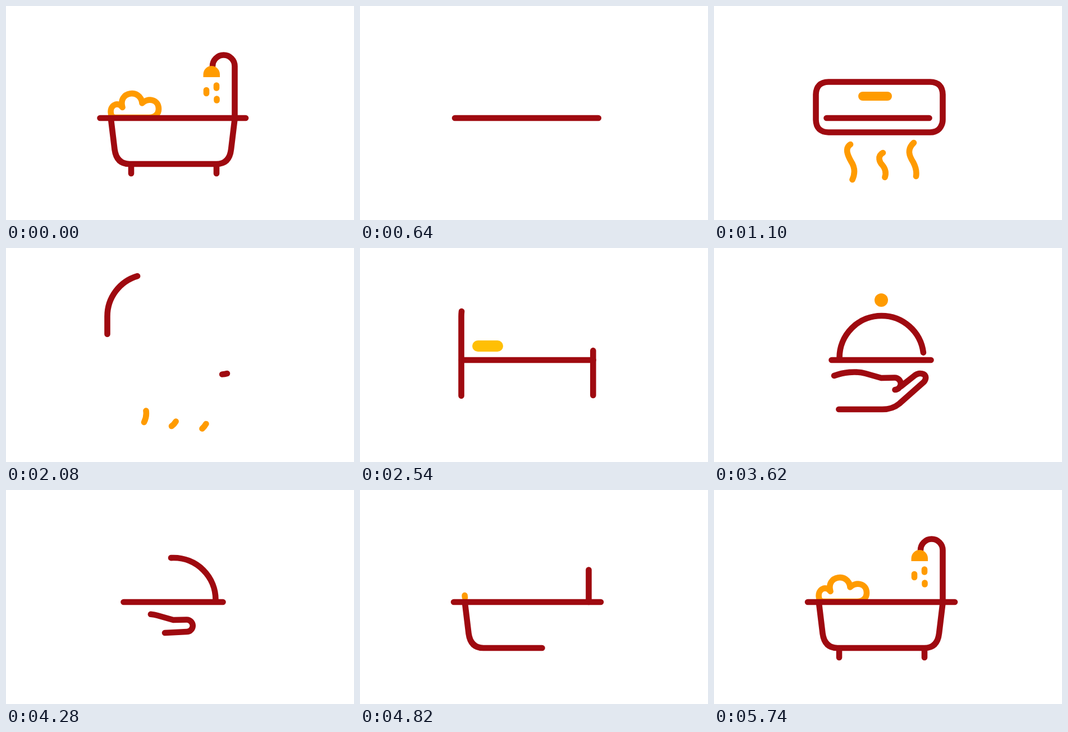
Animation, 620 px wide and 382 px high, one loop 5760 ms. Source, as an HTML page:

```html
<!DOCTYPE html>
<html lang="en">
<head>
<meta charset="utf-8">
<title>Room icons</title>
<style>
  html, body { margin: 0; width: 100%; height: 100%; overflow: hidden; background: #fff; }
  svg { display: block; width: 620px; height: 382px; }
  path { fill: none; stroke-width: 10.6; stroke-linecap: round; stroke-linejoin: round; }
</style>
</head>
<body>
<svg id="stage" viewBox="0 0 620 382"></svg>
<script>
const LOOP = 5760, RED = '#9f0a10', ORANGE = '#ff9b00';
const stage = document.getElementById('stage');

const clamp = x => Math.max(0, Math.min(1, x));
const inOut = x => x < .5 ? 2 * x * x : 1 - 2 * (1 - x) * (1 - x);
const out = x => 1 - (1 - x) * (1 - x);
const ramp = (t, a, b, ease = inOut) => ease(clamp((t - a) / (b - a)));

// Eased value along [time, value] stops.
function track(t, stops) {
  let value = stops[0][1];
  for (let i = 1; i < stops.length; i++) {
    const [a, from] = stops[i - 1], [b, to] = stops[i];
    if (t >= a) value = from + (to - from) * ramp(t, a, b);
  }
  return value;
}

function add(tag, attrs) {
  const el = document.createElementNS('http://www.w3.org/2000/svg', tag);
  for (const name in attrs) el.setAttribute(name, attrs[name]);
  return stage.appendChild(el);
}
const addPath = (d, color = RED) => add('path', { d, stroke: color });

// Shows the part of a path between two lengths.
function segment(el, from, to) {
  el.style.visibility = to - from > .3 ? 'visible' : 'hidden';
  el.setAttribute('stroke-dasharray', `${Math.max(0, to - from)} 9999`);
  el.setAttribute('stroke-dashoffset', -from);
}

// Path, draw start and end, erase start and end, colour.
const strokes = [
  // bathtub
  ['M187 192C184 178 199 169 207.5 181C199 152 240 147 242.500 173.500C251 164 272 165 272 184C272 192 266 199 255 199H195C190 199 187 196 187 192', 4780, 5230, 5830, 6220, ORANGE],
  ['M187 202L193.500 256Q197 282 220 282H375Q398 282 401 256L407.500 202', 4540, 5060, 5860, 6415],
  ['M223 283V299', 4960, 5160, 5840, 6020],
  ['M375 283V299', 5000, 5200, 5940, 6140],
  ['M407.500 200V107.500A19.750 20 0 0 0 368 107.500', 4640, 5060, 5880, 6280],
  // air conditioner
  ['M394 224C403 221 407.500 211 407.500 203V158Q407 136 385 135.500H204Q182 136 181.500 158V203Q182 225 204 225.500H385Q390 225.500 394 224', 650, 1090, 1730, 2116],
  ['M243 247C232 254 239 268 244 277C252 289 251 301 246 311', 830, 1130, 1750, 2295, ORANGE],
  ['M301 262C290 268 295 279 300 284C309 295 307 309 295 318', 860, 1230, 1790, 2205, ORANGE],
  ['M356 244C343 256 348 268 355 279C365 298 360 313 349.500 322.500', 830, 1250, 1760, 2190, ORANGE],
  // served dish
  ['M223.500 196A75 75 0 0 1 373.500 196', 3390, 3660, 4090, 4480],
  ['M214 228C230 222 252 219 270 224L298 232L322 231.500A10.750 10.750 0 0 1 322 253L283 255', 3420, 3720, 4150, 4525]
].map(([d, a, b, c, e, color]) => {
  const el = addPath(d, color);
  return { el, size: el.getTotalLength(), a, b, c, e };
});

// Headboard line that slides on to become the lower hand.
const post = addPath('M255 47A75 75 0 0 0 180.500 122V263A25 25 0 0 0 205 288H300Q318 288 330 278L374 239C384 226 368 219 357 228L333 247');
const postSize = post.getTotalLength();
// Footboard line: sweeps in along an arc and settles upright.
const foot = addPath('M464 134A49 49 0 0 0 415.300 183V263');
const footSize = foot.getTotalLength();
const bar = addPath('M0 0');
const drops = [[357, 150, 156], [375, 141.500, 146.500], [375.500, 165.500, 168.500]]
  .map(([x, y1, y2]) => addPath(`M${x} ${y1}V${y2}`, ORANGE));

// Solid shape, its pivot, grow times and shrink times.
const solids = [
  ['M351.500 127V122A14.750 15 0 0 1 381 122V127Z', 366, 127, 5000, 5200, 5880, 6120],
  ['M265 153H309A8 8 0 0 1 309 169H265A8 8 0 0 1 265 153Z', 287, 161, 880, 1080, 1760, 1940],
  ['M310 93A12 12 0 1 1 286 93A12 12 0 1 1 310 93Z', 298, 93, 3390, 3560, 4080, 4220]
].map(([d, x, y, a, b, c, e]) => ({ el: add('path', { d, style: `fill:${ORANGE}` }), x, y, a, b, c, e }));
const pillow = add('rect', { x: 200, y: 165, width: 55, height: 20, rx: 10, fill: '#ffbe00' });

function drawBar(t) {
  const left = track(t, [[0, 167.5], [400, 167.5], [580, 166.5], [900, 200.5], [1760, 200.5], [2060, 383.5],
    [2061, 415.5], [2150, 415.5], [2400, 181], [3080, 181], [3283, 415.5], [3286, 298], [3490, 209.5],
    [4330, 209.5], [4690, 167]]);
  const right = track(t, [[0, 427], [400, 427], [580, 428], [900, 383.5], [2060, 383.5],
    [2061, 415.5], [3283, 415.5], [3286, 298], [3490, 386.5], [4330, 386.5], [4690, 429]]);
  bar.setAttribute('d', `M${left} 200H${right}`);
  bar.style.visibility = right - left > 1 ? 'visible' : 'hidden';
}

function draw(t) {
  const wrap = t < 900 ? t + LOOP : t;
  const local = s => s.c > LOOP ? wrap : t;

  for (const s of strokes) {
    const now = local(s);
    segment(s.el, s.size * ramp(now, s.c, s.e), s.size * ramp(now, s.a, s.b));
  }
  for (const s of solids) {
    const now = local(s), scale = ramp(now, s.a, s.b, out) - ramp(now, s.c, s.e);
    s.el.setAttribute('transform', `translate(${s.x} ${s.y}) scale(${Math.max(0, scale)}) translate(${-s.x} ${-s.y})`);
  }

  const head = 259 * ramp(t, 1943, 2340, out) + (postSize - 259) * ramp(t, 3129, 3500);
  const tail = 108 * ramp(t, 1957, 2352) + 206 * ramp(t, 3175, 3490) + (postSize - 314) * ramp(t, 4030, 4270);
  segment(post, tail, head);
  const footTop = footSize - 80;
  segment(foot, footTop * ramp(t, 2140, 2380) + 80 * ramp(t, 3220, 3530), footSize * ramp(t, 2090, 2360, out));
  drawBar(t);

  drops.forEach((el, i) => {
    const start = 5210 + i * 50;
    const y = track(wrap, [[start, -24], [start + 200, 8], [start + 310, 0], [5840, 0], [6080, 12]]);
    el.setAttribute('transform', `translate(0 ${y})`);
    el.style.opacity = ramp(wrap, start, start + 80) - ramp(wrap, 5850, 6080);
  });
  pillow.style.opacity = ramp(t, 2360, 2560) - ramp(t, 3060, 3235);
}

function tick() {
  draw(performance.now() % LOOP);
  requestAnimationFrame(tick);
}
tick();
</script>
</body>
</html>
```
